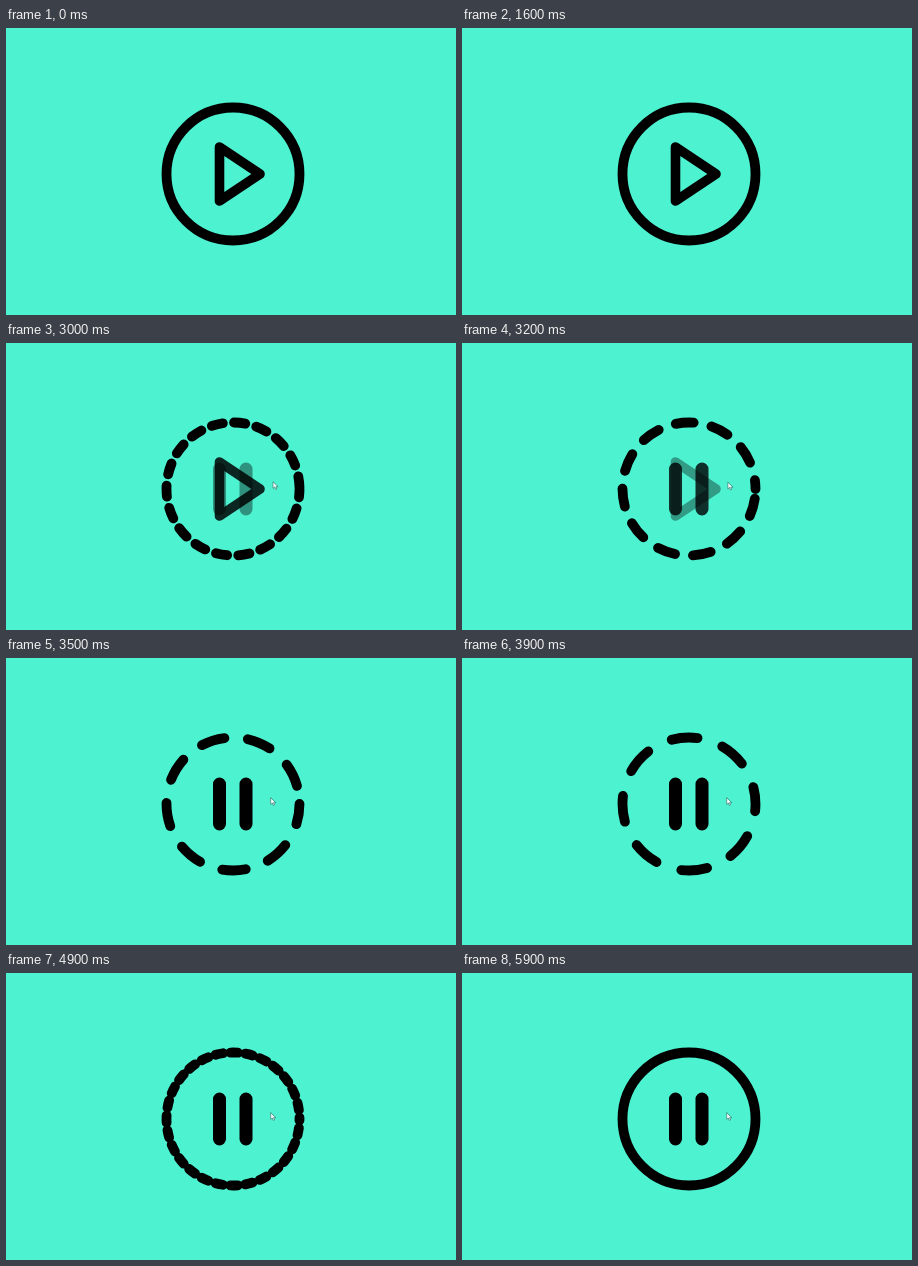
Animation of 450x287 px, one loop 6.7 s. Source, as an HTML page with a canvas:

```html
<!DOCTYPE html>
<html lang="en">
<head>
<meta charset="utf-8">
<title>Play to pause</title>
<style>
  html, body { margin: 0; width: 100%; height: 100%; overflow: hidden; background: #4df2d1; }
  canvas { display: block; width: 450px; height: 287px; }
</style>
</head>
<body>
<canvas id="stage" width="450" height="287"></canvas>
<script>
const LOOP = 6700, STEP = 100;
const ctx = document.getElementById('stage').getContext('2d');

const progress = (t, start, duration) => Math.min(1, Math.max(0, (t - start) / duration));
const mix = (a, b, p) => a + (b - a) * p;

// Same curve as the CSS keyword "ease": cubic-bezier(.25, .1, .25, 1).
function ease(x) {
  let low = 0, high = 1;
  for (let i = 0; i < 24; i++) {
    const s = (low + high) / 2;
    if (0.75 * s - 0.75 * s * s + s ** 3 < x) low = s; else high = s;
  }
  return 0.3 * low + 2.4 * low ** 2 - 1.7 * low ** 3;
}

function strokeLines(lines, width, alpha) {
  ctx.globalAlpha = alpha;
  ctx.lineWidth = width;
  ctx.stroke(new Path2D(lines));
  ctx.globalAlpha = 1;
}

// Equal dashes and gaps grow, travel clockwise and close again.
function drawRing(t) {
  const dash = 26.3 * (ease(progress(t, 2640, 1385)) - ease(progress(t, 4025, 2070)));
  ctx.setLineDash(dash > 0.6 ? [dash, dash] : []);
  ctx.lineDashOffset = -197 * ease(progress(t, 2700, 2900));
  ctx.lineWidth = 9.8;
  ctx.beginPath();
  ctx.arc(227, 146, 66.5, 0, 2 * Math.PI);
  ctx.stroke();
  ctx.setLineDash([]);
}

function drawIcons(t) {
  const fade = progress(t, 2800, 500);
  strokeLines('M213.5 119 L254 146 L213.5 173 Z', 9.6, 1 - fade * fade);
  strokeLines('M213.5 126 V166 M240 126 V166', 13, fade);
}

function drawCursor(t) {
  if (t < 2100) return;
  const enter = progress(t, 2100, 600), settle = progress(t, 2700, 300), rest = progress(t, 3000, 400);
  const x = mix(433, 268, enter) - settle - 2.3 * rest;
  const y = mix(80, 131, enter) + 8 * settle + rest;
  ctx.save();
  ctx.translate(x, y);
  const arrow = new Path2D('M0 0 V6.4 L1.6 5 L2.7 7.5 L3.8 7 L2.8 4.7 H4.8 Z');
  ctx.fillStyle = '#f4fffc';
  ctx.fill(arrow);
  ctx.strokeStyle = '#35665f';
  ctx.lineWidth = 0.6;
  ctx.stroke(arrow);
  ctx.restore();
}

function draw(now) {
  const t = Math.floor((now % LOOP) / STEP) * STEP;
  ctx.fillStyle = '#4df2d1';
  ctx.fillRect(0, 0, 450, 287);
  ctx.strokeStyle = '#000';
  ctx.lineCap = ctx.lineJoin = 'round';
  drawRing(t);
  drawIcons(t);
  drawCursor(t);
}

const begin = performance.now();
function tick() {
  draw(performance.now() - begin);
  requestAnimationFrame(tick);
}
tick();
</script>
</body>
</html>
```
